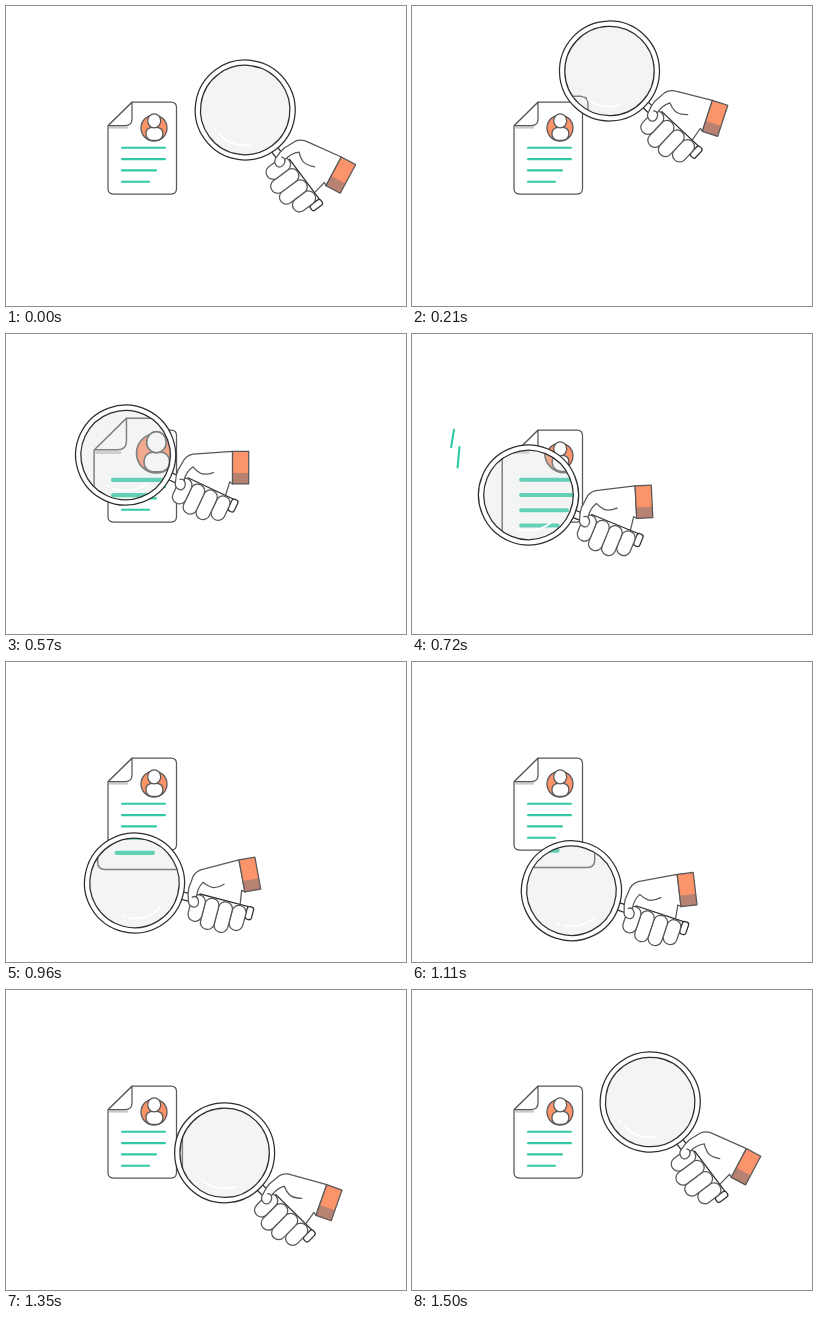
Recreate the animation shown at these times as an HTML page. Size 400 px wide and 300 px high, loop 1530 ms.

```html
<!DOCTYPE html>
<html>
<head>
<meta charset="utf-8">
<title>Document search</title>
<style>
html, body { margin: 0; width: 100%; height: 100%; overflow: hidden; background: #fff; }
svg { display: block; width: 100vw; height: 100vh; }
.ink { stroke: #585858; fill: #fff; stroke-width: 1.25; stroke-linejoin: round; stroke-linecap: round; }
.dark { stroke: #2e2e2e; }
.none { fill: none; }
.green { stroke: #30c9a4; stroke-width: 2.1; stroke-linecap: round; fill: none; }
#copy .green { stroke-width: 3; }
#copy .ink { stroke-width: 1.1; }
#copy .face { transform: scale(1.12); transform-origin: 148px 122px; }
</style>
</head>
<body>
<svg viewBox="0 0 400 300">
  <defs>
    <clipPath id="glass"><circle id="hole" r="44.7"/></clipPath>
  </defs>
  <g id="doc">
    <path class="ink" d="M126 96.200H165Q170.500 96.200 170.500 101.700V182.500Q170.500 188 165 188H107.500Q102 188 102 182.500V120Z"/>
    <path d="M103 121.500H122" stroke="#c9c9c9" stroke-width="2.200"/>
    <path class="ink" d="M126 96.200V113Q126 119.500 119.500 119.500H102.300Z"/>
    <g class="face">
      <circle class="ink" cx="148" cy="122" r="13" style="fill:#fb936b"/>
      <rect class="ink" x="140" y="121.300" width="16.800" height="13" rx="6"/>
      <ellipse class="ink" cx="148.200" cy="114.800" rx="6.500" ry="7"/>
    </g>
    <path id="text" class="green"/>
  </g>
  <path id="tick1" class="green"/>
  <path id="tick2" class="green"/>
  <g id="tool">
    <rect class="ink dark" x="46" y="-3.700" width="24" height="7.600"/>
    <circle class="ink dark" r="50"/>
  </g>
  <g clip-path="url(#glass)">
    <rect width="400" height="300" fill="#fff"/>
    <g id="copy"></g>
    <rect width="400" height="300" fill="#d7dede" opacity=".3"/>
  </g>
  <g id="hand">
    <circle class="ink dark none" r="44.700"/>
    <path transform="rotate(-53)" d="M4.900 35.200A35.500 35.500 0 0 1 -26 24.200M-29.400 20L-30.500 18.200" fill="none" stroke="#fff" stroke-width="1.700" stroke-linecap="round"/>
    <path class="ink" d="M95.200 -48.800L64 -31.500Q56.500 -28 55 -21.500L53.800 -9L60 3H107.500V-7L105.500 -20L109.100 -19.400Z"/>
    <rect class="ink dark" x="66" y="-6" width="50" height="12"/>
    <rect class="ink dark" x="115.500" y="-6.500" width="6.500" height="13" rx="2.500"/>
    <g id="fingers"></g>
    <path class="ink" d="M53.800 -9Q54 -3 56.500 3C58 10 67 10 67 4Q67 0 63.500 -2Q62 -11 66 -18Q70 -16 75 -15.500T87 -21.500"/>
    <path class="ink none" d="M59.500 -1Q61.500 -3 64 -1.800"/>
    <g transform="translate(95.200 -48.800) rotate(-25)">
      <rect width="16.200" height="32.500" fill="#fb936b"/>
      <rect y="21.500" width="16.200" height="11" fill="#b88272"/>
      <rect class="ink none" width="16.200" height="32.500"/>
    </g>
  </g>
</svg>
<script>
const LOOP = 1530, STEP = 30, ZOOM = 1.35;
const $ = id => document.getElementById(id);

// time, lens x, lens y, handle angle
const keys = [
  [0, 239.2, 104, 53.2],
  [210, 197.5, 65, 43.1],
  [420, 133.5, 90, 30.8],
  [540, 121.5, 114, 26],
  [720, 116.5, 161, 22.3],
  [960, 128.5, 221, 14.7],
  [1080, 152, 231.5, 16],
  [1230, 192.2, 201, 32.8],
  [1500, 238.2, 112, 53]
];

const n = keys.length;
const key = i => {
  const turn = Math.floor(i / n), k = keys[i - turn * n];
  return [k[0] + turn * LOOP, ...k.slice(1)];
};
const slope = (i, c) => {
  const a = key(i - 1), b = key(i), d = key(i + 1);
  const h = b[0] - a[0], g = d[0] - b[0];
  return ((b[c] - a[c]) / h * g + (d[c] - b[c]) / g * h) / (h + g);
};

// smooth closed curve through the keys
function at(t, c) {
  let i = n - 1;
  while (keys[i][0] > t) i--;
  const a = key(i), b = key(i + 1), h = b[0] - a[0];
  const s = (t - a[0]) / h, r = 1 - s;
  return a[c] * (1 + 2 * s) * r * r + b[c] * s * s * (3 - 2 * s)
    + h * (slope(i, c) * s * r * r - slope(i + 1, c) * s * s * r);
}

// a dash that runs along a straight line while p goes from 0 to 1
function tick(el, p, x, y, dx, dy) {
  const on = p > 0 && p < 1;
  el.style.display = on ? "" : "none";
  if (!on) return;
  const spot = k => `${x + dx * k} ${y + dy * k}`;
  el.setAttribute("d", `M${spot(p ** 1.64)}L${spot(p ** 0.77)}`);
}

$("text").setAttribute("d", [43, 43, 34, 27]
  .map((w, i) => `M116 ${141.8 + 11.3 * i}h${w}`).join(""));
$("copy").innerHTML = $("doc").innerHTML;
$("copy").querySelector("#text").removeAttribute("id");

// knuckles nearest the lens lie on top
for (let i = 3; i >= 0; i--) {
  const height = 32 - 2.6 * (i - 1.4) ** 2;
  $("fingers").innerHTML +=
    `<rect class="ink" x="${59.5 + 14 * i}" y="-5" width="14" height="${height}" rx="6.8"/>`;
}

function draw(t) {
  const [x, y, angle] = [1, 2, 3].map(c => at(t, c));
  const pose = `translate(${x} ${y}) rotate(${angle})`;
  $("tool").setAttribute("transform", pose);
  $("hand").setAttribute("transform", pose);
  $("hole").setAttribute("transform", `translate(${x} ${y})`);

  // the enlarged page drifts a little as the lens goes round
  const u = (t - 720) / 510;
  const sx = 0.3 - 4.7 * u * u + 2.8 * Math.sin(2.3 * u);
  const sy = 4 - 6 * u ** 3;
  $("copy").setAttribute("transform",
    `translate(${136.5 + sx} ${142 + sy}) scale(${ZOOM}) translate(-136.5 -142)`);

  const p = (t - 600) / 240;
  tick($("tick1"), p, 45.3, 75, -10.5, 65);
  tick($("tick2"), p, 49.7, 88.4, -7, 77);
}

const start = performance.now();
function loop() {
  const t = (performance.now() - start) % LOOP;
  draw(Math.floor(t / STEP) * STEP);
  requestAnimationFrame(loop);
}
loop();
</script>
</body>
</html>
```
